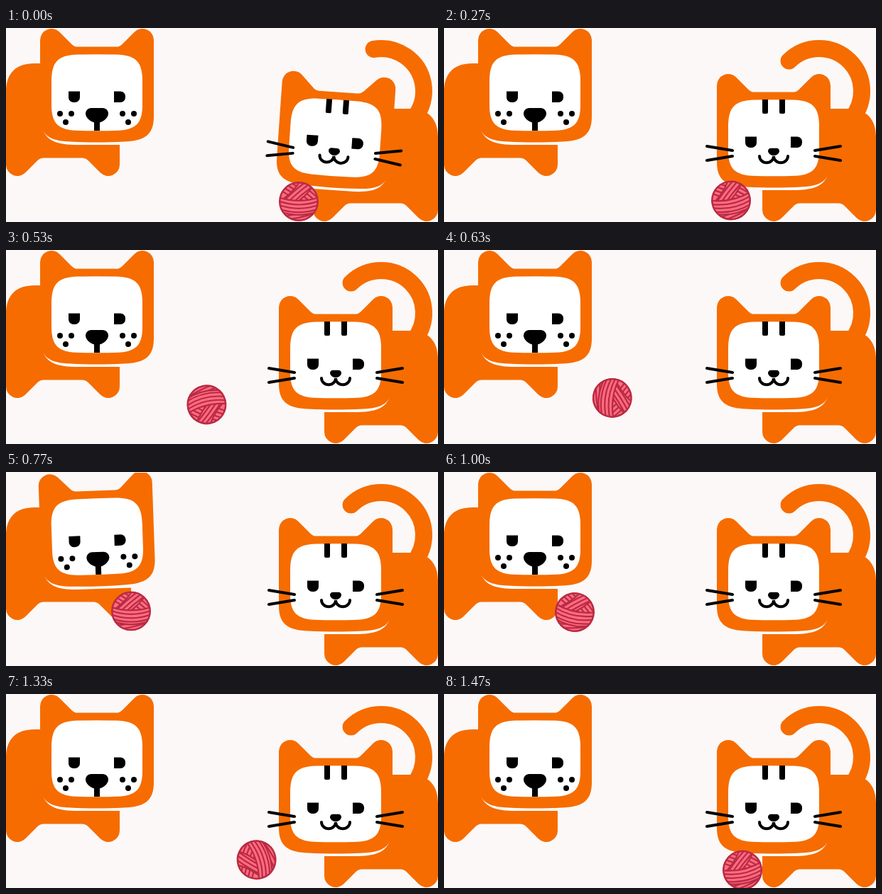
An HTML page with a canvas for the animation above (1510 ms loop, 608 px wide and 274 px high).

```html
<!DOCTYPE html>
<html lang="en">
<head>
<meta charset="utf-8">
<title>Cat and dog playing</title>
<style>
  html, body { margin: 0; width: 100%; height: 100%; overflow: hidden; background: #fcf8f7; }
  canvas { display: block; width: 608px; height: 274px; }
</style>
</head>
<body>
<canvas id="stage"></canvas>
<script>
const W = 608, H = 274, LOOP = 1510;
const BG = '#fcf8f7', ORANGE = '#f66c00', PINK = '#ff6b81', CRIMSON = '#b92b43';
const canvas = document.getElementById('stage');
const ctx = canvas.getContext('2d');
const dpr = window.devicePixelRatio || 1;
canvas.width = W * dpr;
canvas.height = H * dpr;

const rad = deg => deg * Math.PI / 180;

const headShape = new Path2D(`M48 17 A16 16 0 0 1 75.3 5.7 L92.5 22.9 Q96 26.5 101 26.5
  H155 Q160 26.5 163.5 22.9 L180.7 5.7 A16 16 0 0 1 208 17 V125
  C208 152 194 159.5 166 160.5 C140 161.8 116 161.8 90 160.5 C62 159.5 48 152 48 125 Z`);
const faceShape = new Path2D(`M64 75 C64 47 74 38.5 100 37.5 Q128 36.8 156 37.5
  C182 38.5 192 47 192 75 V109 C192 135 182 143.5 158 144.7 Q128 146 98 144.7
  C74 143.5 64 135 64 109 Z`);
const chinGap = new Path2D('M50 136 C54 159 70 164 96 165 H208 V140 H128 Z');
const noseShape = new Path2D(`M120 113 H136 C141 113 144 117 144 121 C144 127 136 134 128 134
  C120 134 112 127 112 121 C112 117 115 113 120 113 Z`);
const catMouth = new Path2D('M108 117 a10 9.3 0 0 0 20 0 a10 9.3 0 0 0 20 0');

// Body with its front foot moved forward by `reach`
function bodyShape(reach) {
  const r = 160 + reach;
  return new Path2D(`M0 90 C0 64 14 50 40 50 H130 V130 H${r} V193 A16 16 0 0 1 ${r - 27.3} 204.3
    L${r - 44.5} 187.1 Q${r - 48} 183.5 ${r - 53} 183.5 H53 Q48 183.5 44.5 187.1
    L27.3 204.3 A16 16 0 0 1 0 193 Z`);
}

function fill(shape, color) {
  ctx.fillStyle = color;
  ctx.fill(shape);
}

function dot(x, y, r) {
  ctx.beginPath();
  ctx.arc(x, y, r, 0, 2 * Math.PI);
  ctx.fill();
}

function box(x, y, w, h, radii) {
  ctx.beginPath();
  ctx.roundRect(x, y, w, h, radii);
  ctx.fill();
}

function line(x1, y1, x2, y2) {
  ctx.beginPath();
  ctx.moveTo(x1, y1);
  ctx.lineTo(x2, y2);
  ctx.stroke();
}

function dogFace() {
  fill(noseShape, '#000');
  ctx.fillRect(124, 132, 8, 13);
  for (const x of [84, 172]) {
    dot(x - 8, 121, 4);
    dot(x + 8, 121, 4);
    dot(x, 133, 4);
  }
}

function catFace() {
  box(112, 37, 8, 20, [0, 0, 2, 2]);
  box(136, 37, 8, 20, [0, 0, 2, 2]);
  ctx.save();
  ctx.translate(64, 49.2);
  ctx.scale(0.5, 0.5);
  ctx.fill(noseShape);
  ctx.restore();
  ctx.strokeStyle = '#000';
  ctx.lineWidth = 4;
  ctx.lineCap = 'round';
  ctx.stroke(catMouth);
  for (const side of [-1, 1]) {
    line(128 + side * 58, 109, 128 + side * 94, 103);
    line(128 + side * 58, 117, 128 + side * 94, 123);
  }
}

function mirror(width) {
  ctx.translate(width, 0);
  ctx.scale(-1, 1);
}

function animal({ headX, y, flip, tilt, reach, features }) {
  const body = bodyShape(reach);
  const toHead = () => {
    ctx.translate(headX + 128, 81);
    ctx.rotate(rad(tilt));
    ctx.translate(-128, -81);
  };
  ctx.save();
  ctx.translate(0, y);

  ctx.save();
  if (flip) mirror(W);
  fill(body, ORANGE);
  ctx.clip(body);
  if (flip) mirror(W);
  toHead();
  if (flip) mirror(256);
  fill(chinGap, '#fff');
  ctx.restore();

  toHead();
  fill(headShape, ORANGE);
  fill(faceShape, '#fff');
  ctx.fillStyle = '#000';
  box(88, 89.5, 16, 15.5, [0, 0, 7, 7]);
  box(152, 89.5, 16, 15.5, [0, 7, 7, 0]);
  features();
  ctx.restore();
}

function tail(endDeg) {
  ctx.strokeStyle = ORANGE;
  ctx.lineWidth = 24;
  ctx.lineCap = 'round';
  ctx.beginPath();
  ctx.arc(528, 89, 60, rad(endDeg), rad(40));
  ctx.stroke();
}

// Parallel curved threads inside the outline given by `edge`
function threads(edge, angle, from, to, gap, sag) {
  ctx.save();
  const area = new Path2D(edge);
  fill(area, PINK);
  ctx.stroke(area);
  ctx.clip(area);
  ctx.rotate(rad(angle));
  for (let y = from; y <= to; y += gap) {
    ctx.beginPath();
    ctx.moveTo(-32, y);
    ctx.quadraticCurveTo(0, y + sag, 32, y);
    ctx.stroke();
  }
  ctx.restore();
}

function yarn({ x, y, turn }) {
  ctx.save();
  ctx.translate(x, y);
  ctx.rotate(rad(turn));
  ctx.strokeStyle = CRIMSON;
  ctx.lineWidth = 2.2;
  ctx.lineCap = 'butt';
  ctx.save();
  ctx.beginPath();
  ctx.arc(0, 0, 27.5, 0, 2 * Math.PI);
  ctx.clip();
  threads('M-32 -32 H32 V32 H-32 Z', 38, -30, 8, 5.6, -5);
  threads('M-32 2 Q-10 -8 4 -32 L26 -32 Q14 -8 -8 4 Z', -42, -24, 6, 5.4, -4);
  threads('M-32 10 Q0 22 32 10 V32 H-32 Z', -14, 8, 30, 5.4, 7);
  threads('M-32 -7 Q0 5 32 -7 V12 Q0 26 -32 12 Z', 0, -2, 9, 5.4, 13);
  ctx.restore();
  ctx.lineWidth = 2.5;
  ctx.beginPath();
  ctx.arc(0, 0, 26.7, 0, 2 * Math.PI);
  ctx.stroke();
  ctx.restore();
}

// Thirty steps a second: cat hit, roll left, dog hit, roll right
function ballAt(step) {
  if (step < 8) return { x: 412, y: 245, turn: 0 };
  if (step < 23) {
    const k = step - 8;
    return { x: 404 - 15.2 * k, y: 243.5 - 3.14 * k, turn: -12 - 22.7 * k };
  }
  if (step < 30) return { x: 176, y: 196.4, turn: 0 };
  const k = step - 30;
  return { x: 184 + 16.86 * k, y: 198 + 3.62 * k, turn: 12 + 24 * k };
}

function draw(ms) {
  const step = Math.min(44, Math.floor((Math.floor(ms / 10) * 10 + 5) * 0.03));
  const catHit = step < 8;
  const dogHit = step >= 23 && step < 30;

  ctx.setTransform(dpr, 0, 0, dpr, 0, 0);
  ctx.fillStyle = BG;
  ctx.fillRect(0, 0, W, H);
  ctx.save();
  ctx.beginPath();
  ctx.rect(0, 1, W, H - 1);
  ctx.clip();
  animal({ headX: 0, y: 0, flip: false, tilt: dogHit ? -2 : 0, reach: dogHit ? 16 : 0, features: dogFace });
  tail(catHit ? -100 : -135);
  animal({ headX: 336, y: 64, flip: true, tilt: catHit ? 4 : 0, reach: catHit ? 16 : 0, features: catFace });
  yarn(ballAt(step));
  ctx.restore();
}

const start = performance.now();
function tick() {
  draw((performance.now() - start) % LOOP);
  requestAnimationFrame(tick);
}
tick();
</script>
</body>
</html>
```
